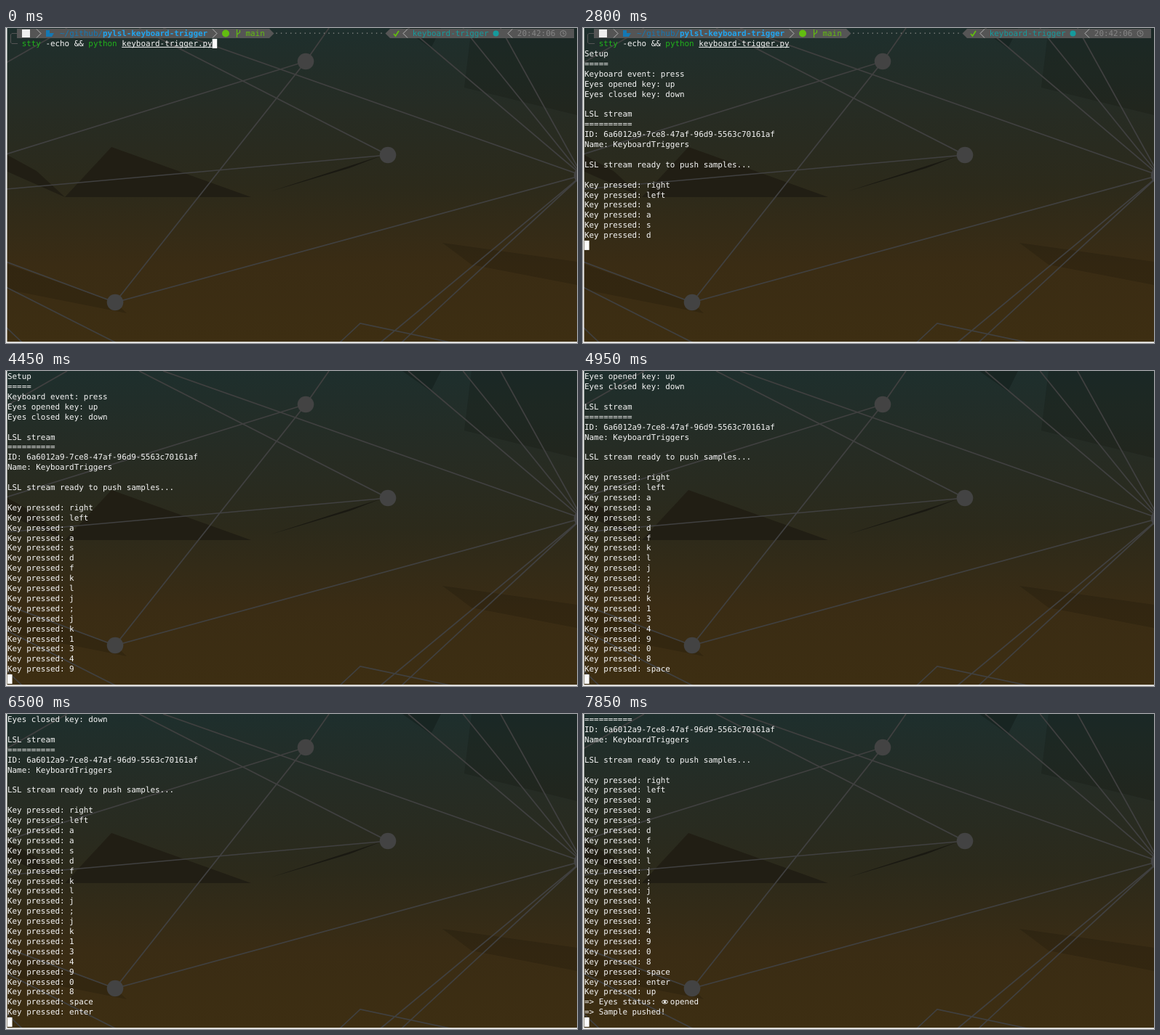
Recreate the animation shown at these times as an HTML page with a canvas. Size 785x434 px, loop 8 s.

```html
<!DOCTYPE html>
<html lang="en">
<head>
<meta charset="utf-8">
<title>Terminal</title>
<style>
  html, body { margin: 0; width: 100%; height: 100%; overflow: hidden; background: #2b2a1e; }
  canvas { display: block; }
</style>
</head>
<body>
<canvas id="stage" width="785" height="434"></canvas>
<script>
const W = 785, H = 434, LOOP = 8000;
const CELL = 6.55, LINE = 13.9, ROWS = 31, MID = 7.5;
const FONT = '10.88px "DejaVu Sans Mono", monospace';
const WHITE = '#f6f6f6', GREEN = '#20b31b', BAR = '#555555';
const ctx = document.getElementById('stage').getContext('2d');
ctx.textRendering = 'geometricPrecision';

const colX = col => 2 + col * CELL;
const rowY = row => row * LINE;

// Terminal output: each event appends its lines at its time.
const banner = `Setup
=====
Keyboard event: press
Eyes opened key: up
Eyes closed key: down

LSL stream
==========
ID: 6a6012a9-7ce8-47af-96d9-5563c70161af
Name: KeyboardTriggers

LSL stream ready to push samples...
`.split('\n');
const press = (time, key, ...more) => ({ time, lines: ['Key pressed: ' + key, ...more] });
const burst = [...'aasdfklj;jk134908', 'space'];
const events = [
  { time: 100, lines: [] },
  { time: 700, lines: banner },
  press(1500, 'right'),
  press(1900, 'left'),
  ...burst.map((key, i) => press(2290 + 153 * i, key)),
  press(5450, 'enter'),
  press(7400, 'up', '=> Eyes status:   opened', '=> Sample pushed!')
];

function path(points, close) {
  ctx.beginPath();
  points.forEach(([x, y]) => ctx.lineTo(x, y));
  if (close) ctx.closePath();
}
function fill(color, ...points) {
  ctx.fillStyle = color;
  path(points, true);
  ctx.fill();
}
function stroke(color, width, ...points) {
  ctx.strokeStyle = color;
  ctx.lineWidth = width;
  path(points);
  ctx.stroke();
}
function oval(x, y, rx, ry = rx) {
  ctx.beginPath();
  ctx.ellipse(x, y, rx, ry, 0, 0, 2 * Math.PI);
}
function disc(color, x, y, r) {
  ctx.fillStyle = color;
  oval(x, y, r);
  ctx.fill();
}
function ring(color, x, y, rx, ry) {
  ctx.strokeStyle = color;
  ctx.lineWidth = 1;
  oval(x, y, rx, ry);
  ctx.stroke();
}
function text(str, col, row, color = WHITE, weight = '') {
  ctx.font = weight + ' ' + FONT;
  ctx.fillStyle = color;
  ctx.fillText(str, colX(col), rowY(row) + 11.1);
}

function drawFacets() {
  const shade = 'rgba(10,10,5,.16)', dark = '#211e14';
  fill(shade, [640, 0], [W, 0], [W, 120], [630, 82]);
  fill(shade, [600, 296], [W, 322], [W, 354], [640, 326]);
  fill(shade, [0, 325], [150, 378], [166, 393], [0, 360]);
  fill(dark, [145, 164], [337, 233], [81, 233]);
  fill(dark, [0, 174], [42, 197], [81, 233], [0, 197]);
  fill('#1a1912', [364, 225], [516, 176], [472, 193]);
  fill('#182522', [545, 0], [598, 0], [584, 28]);
}

function drawNetwork() {
  const top = [412, 46], middle = [525, 175], low = [150, 378], hub = [792, 203];
  const corner = [487, 407];
  const link = (...points) => stroke('#404040', 1.7, ...points);
  link([0, 174], top, low, hub);
  link(top, [444, 0]);
  link([0, 222], middle, [183, 0]);
  link([216, 0], hub);
  for (let i = 0; i < 3; i++) link([hub[0] - 239 * .685 ** i, 0], hub);
  for (const x of [514, 543]) link([x, H], hub);
  link([458, H], corner, [615, H]);
  link([0, 322], low);
  link([0, 357], [152, H]);
  link([0, 412], [23, H]);
  link([0, 48], [84, 0]);
  for (const node of [top, middle, low, hub]) disc('#434343', ...node, 11.3);
}

function drawWallpaper() {
  const sky = ctx.createLinearGradient(0, 0, 0, H);
  ['#1e2f2d', '#262c24', '#2c2a1b', '#3a2c14', '#3d2e12'].forEach((color, i) => sky.addColorStop(i / 4, color));
  ctx.fillStyle = sky;
  ctx.fillRect(0, 0, W, H);
  drawFacets();
  drawNetwork();
}

function drawBar(flat, tip) {
  const shoulder = tip + 6.5 * Math.sign(flat - tip);
  fill(BAR, [flat, 1], [shoulder, 1], [tip, MID], [shoulder, 14], [flat, 14]);
}
function chevron(x, reach) {
  stroke('#b4b4b4', 1, [x, 1.5], [x + reach, MID], [x, 13.5]);
}

function drawPrompt() {
  const blue = '#1478b4', teal = '#159a9c', lime = '#62bd10', gray = '#858585';
  drawBar(15, 368.5);
  drawBar(781, 521.5);
  stroke(BAR, 1, [15, MID], [8, MID], [6.5, 9], [6.5, 20], [8, 21.5], [16, 21.5]);

  ctx.fillStyle = '#eeeeee';
  ctx.fillRect(22, 2, 11, 11);
  for (const x of [42, 284]) chevron(x, 6);
  for (const x of [552, 696]) chevron(x, -6);

  ctx.fillStyle = blue;
  ctx.fillRect(55, 3, 5, 9);
  fill(blue, [58, 7], [66, 7], [63, 12], [55, 12]);
  text('~/github/', 11, 0, blue);
  text('pylsl-keyboard-trigger', 20, 0, '#20a5ef', 'bold');

  disc(lime, 302, MID, 5);
  stroke(lime, 1.2, [317.5, 2], [317.5, 13]);
  stroke(lime, 1.2, [321.5, 3], [321.5, 6], [317.5, 9]);
  text('main', 50, 0, lime);

  text('·'.repeat(23), 56, 0, '#777b78');
  stroke(lime, 1.8, [533, 8], [535.5, 11], [540, 4]);
  text('keyboard-trigger', 85, 0, teal);
  disc(teal, 673.5, MID, 4);
  text('20:42:06', 107, 0, gray);
  ring(gray, 766, MID, 4);
  stroke(gray, 1, [766, 5], [766, 8], [768, 8]);
}

function drawCommand(row) {
  text('stty', 3, row, GREEN);
  text('-echo &&', 8, row);
  text('python', 17, row, GREEN);
  text('keyboard-trigger.py', 24, row);
  ctx.fillRect(colX(24), rowY(row) + 12, 19 * CELL, 1);
}

function drawEye(row) {
  const x = 112.5, y = rowY(row) + MID;
  ring(WHITE, x, y, 4, 2.4);
  disc(WHITE, x, y, 1.6);
}

function draw(time) {
  const past = events.filter(event => event.time <= time);
  const lines = past.flatMap(event => event.lines);
  const lastTime = past.length ? past.at(-1).time : 0;
  const cursorRow = past.length ? 2 + lines.length : 1;
  const scroll = Math.max(0, cursorRow - ROWS + 1);

  drawWallpaper();
  if (scroll < 1) drawPrompt();
  if (scroll < 2) drawCommand(1 - scroll);
  lines.forEach((line, i) => {
    const row = i + 2 - scroll;
    if (row < 0) return;
    text(line, 0, row);
    if (line.endsWith('opened')) drawEye(row);
  });

  const blinkOn = (time - lastTime) % 1000 < 500;
  if (blinkOn) {
    ctx.fillStyle = '#fcfcfc';
    ctx.fillRect(colX(past.length ? 0 : 43), rowY(cursorRow - scroll) + 1, CELL, 13);
  }
  ctx.fillStyle = '#f4f4f4';
  ctx.fillRect(0, 0, 1.5, H);
  ctx.fillRect(0, 432.3, W, 2);
}

const start = performance.now();
function tick() {
  draw((performance.now() - start) % LOOP);
  requestAnimationFrame(tick);
}
tick();
</script>
</body>
</html>
```
